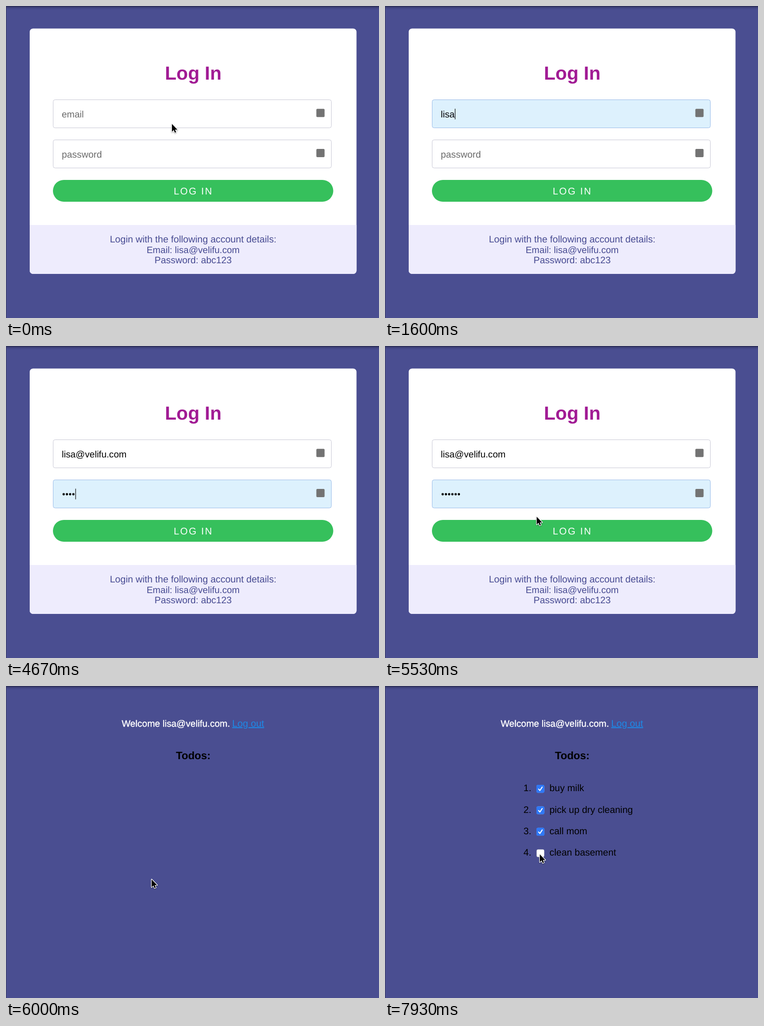
An HTML page for the animation above (8000 ms loop, 771 by 644 pixels).

```html
<!DOCTYPE html>
<html lang="en">
<head>
<meta charset="utf-8">
<title>Log In</title>
<style>
  html, body { margin: 0; width: 100%; height: 100%; overflow: hidden; background: #4a4e91; }
  svg { display: block; width: 100vw; height: 100vh; font-family: "Liberation Sans", Arial, sans-serif; }
  text { white-space: pre; text-rendering: geometricPrecision; }
  .mid { text-anchor: middle; }
  .bold { font-weight: bold; }
</style>
</head>
<body>
<svg id="stage" viewBox="0 0 771 644">
  <defs>
    <linearGradient id="shade" x2="0" y2="1">
      <stop stop-color="#26284c"/>
      <stop offset=".35" stop-color="#3a3d74" stop-opacity=".75"/>
      <stop offset="1" stop-color="#4a4e91" stop-opacity="0"/>
    </linearGradient>
    <clipPath id="cardShape"><rect x="49" y="46.5" width="675.5" height="506.5" rx="7"/></clipPath>
  </defs>
  <rect width="771" height="644" fill="#4a4e91"/>
  <rect width="771" height="9" fill="url(#shade)"/>
  <rect width="1" height="644" fill="#3a3c62"/>

  <g id="login">
    <g clip-path="url(#cardShape)">
      <rect x="49" y="46" width="676" height="507" fill="#fff"/>
      <rect x="49" y="452" width="676" height="101" fill="#eeecfd"/>
    </g>
    <text class="mid bold" x="387" y="152" font-size="39" fill="#a11b94">Log In</text>
    <g id="fields"></g>
    <path id="squiggle" d="M118 232H206" stroke="#e5405a" stroke-width="2.4" stroke-linecap="round" stroke-dasharray="0 4"/>
    <rect id="caret" width="1.2" height="22" fill="#111"/>
    <rect id="ring" x="95" y="355.7" width="584" height="50.6" rx="2" fill="none" stroke="#5d9bf0" stroke-width="3.4"/>
    <rect x="97" y="359" width="579.5" height="45" rx="22.5" fill="#36c05c"/>
    <text x="346.8" y="388.8" font-size="20" letter-spacing="2.2" fill="#fff">LOG IN</text>
    <g class="mid" fill="#474b92">
      <text x="386.8" y="488" font-size="19.6">Login with the following account details:</text>
      <text id="hint" x="386.8" y="509.5" font-size="19.1"></text>
      <text x="386.8" y="531.3" font-size="19.4">Password: abc123</text>
    </g>
  </g>

  <g id="home">
    <text id="welcome" x="239.2" y="84" font-size="19.1" fill="#fff" stroke="#fff" stroke-width=".4"></text>
    <text x="467.6" y="84" font-size="19.8" fill="#1e88e5" text-decoration="underline">Log out</text>
    <text class="mid bold" x="387" y="151" font-size="22">Todos:</text>
    <g id="todos" font-size="19.5"></g>
  </g>

  <path id="cursor" d="M0 0V16L3.7 12.6L6.1 18L8.6 17L6.3 11.7H11.3Z" fill="#000" stroke="#fff"
    stroke-width="2.4" stroke-linejoin="round" paint-order="stroke" style="filter:drop-shadow(0 1px 1px #0006)"/>
</svg>
<script>
const LOOP = 8000;
const EMAIL = 'lisa@velifu.com';
const TODOS = ['buy milk', 'pick up dry cleaning', 'call mom', 'clean basement'];

const FOCUS_EMAIL = 500, FOCUS_PASSWORD = 3800, SUBMIT = 5850, HOME = 5995, LIST = 6070;
const EMAIL_KEYS = [950, 1130, 1300, 1450,
  ...Array.from({ length: 11 }, (_, i) => 1730 + i * 142)];
const PASSWORD_KEYS = [4130, 4300, 4450, 4600, 4850, 5020];
const CHECKS = [6760, 7140, 7540];
// time, x, y of the pointer tip
const POINTER = [
  [0, 343, 243.5], [5200, 343, 243.5], [5720, 301, 399.2], [6100, 301, 399.2],
  [6650, 320, 213], [6830, 320, 213], [7060, 320, 257], [7220, 320, 257],
  [7440, 320, 302], [7700, 320, 302], [7900, 320, 347.5]];

const $ = id => document.getElementById(id);
const show = (el, on) => { el.style.display = on ? '' : 'none'; };

function add(parent, tag, attrs, text = '') {
  const el = document.createElementNS('http://www.w3.org/2000/svg', tag);
  for (const key in attrs) el.setAttribute(key, attrs[key]);
  el.textContent = text;
  return parent.appendChild(el);
}

function makeField(top, label, size) {
  const box = add($('fields'), 'rect', { x: 97.5, y: top, width: 575, height: 58, rx: 4 });
  const text = add($('fields'), 'text', { x: 115.2, y: top + 36.7, 'font-size': size });
  add($('fields'), 'rect', { x: 641.5, y: top + 18.7, width: 17, height: 17, rx: 2, fill: '#737373' });
  return { box, text, label };
}

function setField({ box, text, label }, value, focused) {
  box.setAttribute('fill', focused ? '#ddf1fd' : '#fff');
  box.setAttribute('stroke', focused ? '#9dbde9' : '#c9c9d6');
  text.textContent = value ?? label;
  text.setAttribute('fill', value === null ? '#6b6b6b' : '#000');
}

const email = makeField(193.5, 'email', 19.1);
const password = makeField(276.3, 'password', 19.4);
const dots = PASSWORD_KEYS.map((_, i) =>
  add($('fields'), 'circle', { cx: 119.2 + i * 6.7, cy: 306, r: 2.4 }));

$('hint').textContent = `Email: ${EMAIL}`;
$('welcome').textContent = `Welcome ${EMAIL}.`;

const ticks = TODOS.map((name, i) => {
  const row = add($('todos'), 'g', { transform: `translate(0 ${i * 44.3})` });
  add(row, 'text', { x: 286.2, y: 217.4 }, `${i + 1}.`);
  add(row, 'text', { x: 340, y: 217.4 }, name);
  add(row, 'rect', { x: 313.5, y: 204.5, width: 15.5, height: 15.5, rx: 3, fill: '#fff', stroke: '#c8c8d0', 'stroke-width': .6 });
  const tick = add(row, 'g', {});
  add(tick, 'rect', { x: 313, y: 204, width: 16.5, height: 16.5, rx: 3.2, fill: '#2f78f6' });
  add(tick, 'path', { d: 'M317.5 212.7L320.2 215.8L325 208.5', fill: 'none', stroke: '#fff',
    'stroke-width': 2, 'stroke-linecap': 'round', 'stroke-linejoin': 'round' });
  return tick;
});

function pointerAt(t) {
  const next = POINTER.findIndex(p => p[0] > t);
  if (next < 0) return POINTER.at(-1).slice(1);
  const [t0, x0, y0] = POINTER[next - 1], [t1, x1, y1] = POINTER[next];
  const u = (t - t0) / (t1 - t0), k = u * u * (3 - 2 * u);
  return [x0 + (x1 - x0) * k, y0 + (y1 - y0) * k];
}

function renderLogin(t) {
  const typed = EMAIL_KEYS.filter(k => k <= t);
  const hidden = PASSWORD_KEYS.filter(k => k <= t);
  const inEmail = t >= FOCUS_EMAIL && t < FOCUS_PASSWORD;
  const inPassword = t >= FOCUS_PASSWORD && t < SUBMIT;

  setField(email, typed.length ? EMAIL.slice(0, typed.length) : null, inEmail);
  setField(password, hidden.length ? '' : null, inPassword);
  dots.forEach((dot, i) => show(dot, i < hidden.length));
  show($('squiggle'), inEmail && typed.length > 11);
  show($('ring'), t >= SUBMIT);

  // the caret blinks while idle and restarts with every key
  const keys = inEmail ? typed : hidden;
  const since = t - (keys.at(-1) ?? (inEmail ? FOCUS_EMAIL : FOCUS_PASSWORD));
  show($('caret'), (inEmail || inPassword) && since % 1000 < 500);
  const width = inEmail ? (typed.length && email.text.getComputedTextLength()) : hidden.length * 6.7 + .8;
  $('caret').setAttribute('x', 115.7 + width);
  $('caret').setAttribute('y', inEmail ? 212 : 294.5);
}

function render(t) {
  const home = t >= HOME;
  show($('login'), !home);
  show($('home'), home);
  if (!home) renderLogin(t);
  show($('todos'), t >= LIST);
  ticks.forEach((tick, i) => show(tick, t >= CHECKS[i]));
  show($('cursor'), t < EMAIL_KEYS[0] || t >= 5200);
  $('cursor').setAttribute('transform', `translate(${pointerAt(t)})`);
}

const start = performance.now();
function tick() {
  render((performance.now() - start) % LOOP);
  requestAnimationFrame(tick);
}
tick();
</script>
</body>
</html>
```
